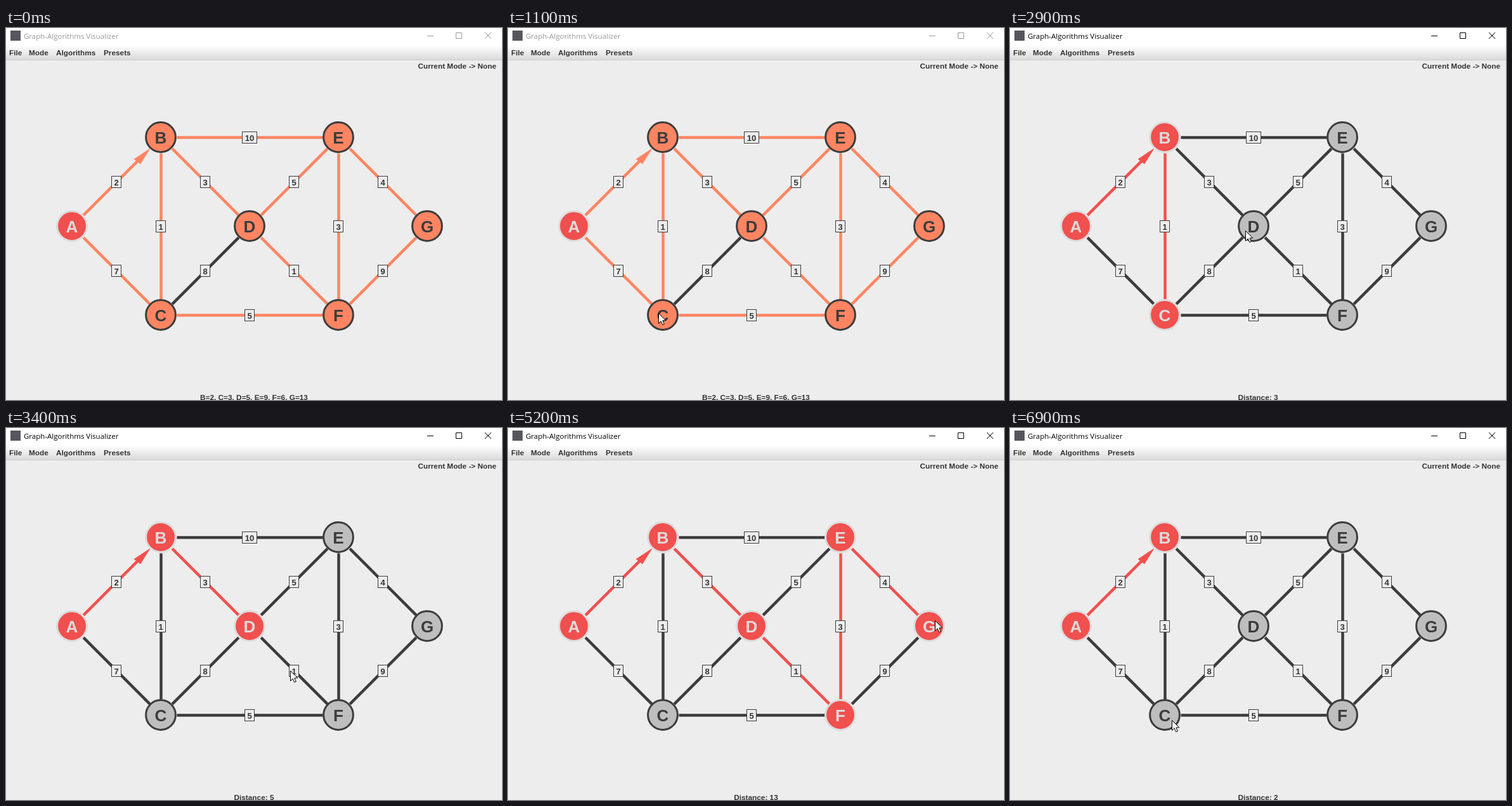
Animation, 782 px wide and 586 px high, one loop 7.1 s. Source, as an HTML page:

```html
<!DOCTYPE html>
<html lang="en">
<head>
<meta charset="utf-8">
<title>Graph-Algorithms Visualizer</title>
<style>
  html, body { margin: 0; width: 100%; height: 100%; overflow: hidden; background: #ededed; }
  svg { display: block; width: 782px; height: 586px; }
  text { font: bold 11.8px "Liberation Sans", Arial, sans-serif; fill: #333; }
  .title { font: 11.5px "Open Sans", "Noto Sans", sans-serif; }
  .name { font-size: 26px; text-anchor: middle; }
  .weight { font-size: 13px; text-anchor: middle; }
</style>
</head>
<body>
<svg id="stage" viewBox="0 0 782 586">
  <defs>
    <linearGradient id="bar" x2="0" y2="1">
      <stop offset="0" stop-color="#fff"/>
      <stop offset="1" stop-color="#dadada"/>
    </linearGradient>
  </defs>
</svg>
<script>
const LOOP = 7100, STEP = 100;
const DARK = '#3c3c3c', RED = '#f0504e', ORANGE = '#ff8562', GREY = '#bebebe', PALE = '#dcdcdc', PANEL = '#ededed';

const nodes = {
  A: [104, 312], B: [244, 172], C: [244, 452], D: [384, 312],
  E: [524, 172], F: [524, 452], G: [664, 312]
};
const edges = {
  AB: 2, AC: 7, BC: 1, BD: 3, BE: 10, CD: 8, CF: 5,
  DE: 5, DF: 1, EF: 3, EG: 4, FG: 9
};

// Each click selects the shortest path from A; the first entry shows all distances.
const states = [
  { at: 0, path: '', note: 'B=2, C=3, D=5, E=9, F=6, G=13' },
  { at: 1300, path: 'ABC', note: 'Distance: 3' },
  { at: 3000, path: 'ABD', note: 'Distance: 5' },
  { at: 3600, path: 'ABDF', note: 'Distance: 6' },
  { at: 4000, path: 'ABDFE', note: 'Distance: 9' },
  { at: 4800, path: 'ABDFEG', note: 'Distance: 13' },
  { at: 5900, path: 'AB', note: 'Distance: 2' }
];

// Pointer stops: time, x, y
const stops = [
  [400, 258, 590], [900, 237, 449], [1600, 237, 449], [1900, 237, 467], [2100, 237, 467],
  [2800, 371, 319], [3200, 371, 319], [3600, 525, 445], [3700, 525, 445],
  [4000, 540, 157], [4100, 540, 157], [4500, 706, 270], [4800, 673, 303],
  [5200, 673, 303], [5800, 245, 170], [6000, 245, 170],
  [6200, 248, 300], [6300, 248, 300], [6600, 255, 460]
];

const stage = document.getElementById('stage');

function add(tag, attrs, text) {
  const el = document.createElementNS('http://www.w3.org/2000/svg', tag);
  set(el, attrs);
  if (text) el.textContent = text;
  return stage.appendChild(el);
}

function set(el, attrs) {
  for (const key in attrs) el.setAttribute(key, attrs[key]);
}

// Window frame
add('rect', { width: 782, height: 586, fill: PANEL });
add('rect', { width: 782, height: 27, fill: '#fff' });
add('rect', { y: 27, width: 782, height: 23, fill: 'url(#bar)' });
add('rect', { y: 50, width: 782, height: 1, fill: '#cdcdcd' });
add('rect', { x: 7, y: 4, width: 16, height: 16, fill: '#56565c' });
const title = add('text', { x: 28, y: 17, class: 'title' }, 'Graph-Algorithms Visualizer');
const controls = add('path', {
  d: 'M664 12.5h10M709.5 7.5h9v9h-9zM755 7l10 10M765 7l-10 10', fill: 'none'
});
[['File', 5], ['Mode', 36], ['Algorithms', 79], ['Presets', 154]]
  .forEach(([label, x]) => add('text', { x, y: 43 }, label));
add('text', { x: 773, y: 64, 'text-anchor': 'end' }, 'Current Mode -> None');
const note = add('text', { x: 391, y: 586, 'text-anchor': 'middle' });

// Graph
const lines = {}, discs = {}, names = {};
for (const key in edges) {
  const [p, q] = [...key].map(n => nodes[n]);
  const dx = q[0] - p[0], dy = q[1] - p[1], len = Math.hypot(dx, dy);
  const ux = dx / len * 25, uy = dy / len * 25;
  const trim = key === 'AB' ? 1.6 : 1;
  lines[key] = add('line', {
    x1: p[0] + .5 + ux, y1: p[1] + .5 + uy,
    x2: q[0] + .5 - ux * trim, y2: q[1] + .5 - uy * trim, 'stroke-width': 4.5
  });
}
const arrow = add('path', { d: 'M228 189L201.5 206.5L212 214.5z' });

for (const key in edges) {
  const [p, q] = [...key].map(n => nodes[n]);
  const x = (p[0] + q[0]) / 2, y = (p[1] + q[1]) / 2;
  const w = edges[key] > 9 ? 23 : 15;
  add('rect', {
    x: Math.floor(x - w / 2) + .5, y: y - 8.5, width: w, height: 18,
    fill: PANEL, stroke: DARK
  });
  add('text', { x, y: y + 5.5, class: 'weight' }, edges[key]);
}

for (const n in nodes) {
  const [x, y] = nodes[n];
  discs[n] = add('circle', { cx: x, cy: y, r: 23.4, 'stroke-width': 3 });
  names[n] = add('text', { x, y: y + 10, class: 'name' }, n);
}

const pointer = add('path', {
  d: 'M.5 .5v16l3.7-3.6 2.5 5.7 2.6-1.1-2.5-5.6h5z', fill: '#fff', stroke: '#000'
});

function pointerAt(t) {
  const i = stops.findIndex(s => s[0] > t);
  if (i < 0) return stops[stops.length - 1].slice(1);
  if (i === 0) return null;
  const a = stops[i - 1], b = stops[i];
  const k = (t - a[0]) / (b[0] - a[0]), e = k * k * (3 - 2 * k);
  return [a[1] + (b[1] - a[1]) * e, a[2] + (b[2] - a[2]) * e];
}

function onPath(key, path) {
  return path.includes(key) || path.includes(key[1] + key[0]);
}

function draw(t) {
  const state = states.filter(s => s.at <= t).pop();
  const { path } = state;
  const ink = path ? '#000' : '#999';
  title.style.fill = ink;
  set(controls, { stroke: ink });
  note.textContent = state.note;

  for (const key in lines) {
    const idle = path || key === 'CD' ? DARK : ORANGE;
    set(lines[key], { stroke: onPath(key, path) ? RED : idle });
  }
  set(arrow, { fill: path ? RED : ORANGE });

  for (const n in nodes) {
    const hot = n === 'A' || path.includes(n);
    set(discs[n], { fill: hot ? RED : path ? GREY : ORANGE, stroke: hot ? PALE : DARK });
    names[n].style.fill = hot ? PALE : DARK;
  }

  const pos = pointerAt(t);
  set(pointer, {
    visibility: pos ? 'visible' : 'hidden',
    transform: pos ? `translate(${pos.map(Math.round)})` : ''
  });
}

const start = performance.now();
function tick() {
  const t = (performance.now() - start) % LOOP;
  draw(Math.floor(t / STEP) * STEP);
  requestAnimationFrame(tick);
}
tick();
</script>
</body>
</html>
```
